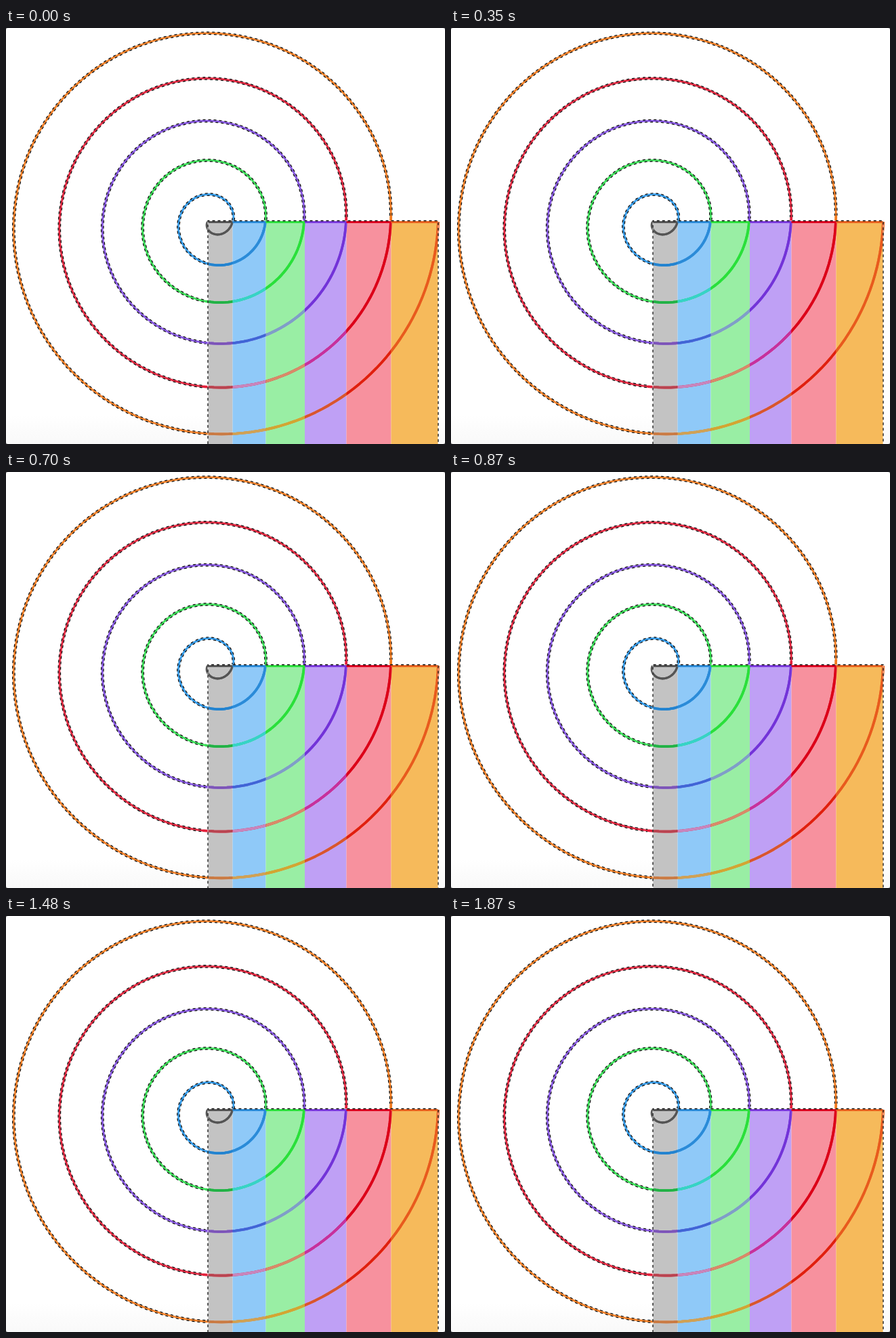
An HTML page that plays this animation: 648 by 614 pixels, repeating every 1.91 s.

```html
<!DOCTYPE html>
<html lang="en">
<head>
<meta charset="utf-8">
<title>Spiral selection</title>
<style>
  html, body { margin: 0; width: 100%; height: 100%; overflow: hidden; background: #fff; }
  svg { display: block; width: 648px; height: 614px; }
</style>
</head>
<body>
<svg id="stage" viewBox="0 0 648 614" fill="none">
  <defs>
    <linearGradient id="floor" x2="0" y2="1">
      <stop stop-color="#fff"/><stop offset="1" stop-color="#f9f9f9"/>
    </linearGradient>
  </defs>
  <rect width="648" height="614" fill="#fff"/>
  <rect y="570" width="648" height="44" fill="url(#floor)"/>
  <path d="M0 0H3Q0 0 0 3ZM648 0H645Q648 0 648 3ZM0 614H3Q0 614 0 611ZM648 614H645Q648 614 648 611Z" fill="#777"/>
</svg>
<script>
const LOOP = 1910, STEPS = 44, DASH = 8, CYCLES = 5;
const CX = 307, CY = 286, LEFT = 298, RIGHT = 638, BOTTOM = 614;
const RIM = 1.7; // distance from the middle of a stroke to its dashed edges
const stage = document.getElementById('stage');

// Spiral radius after each half turn
const radii = [10, 28, 52, 76, 105, 133, 164.5, 195, 228, 261, 295.5, 331];
const edges = [LEFT, 334.5, 383.5, 441, 502.5, 568.5, RIGHT];
const fills = ['#c3c3c3', '#8fc9f8', '#99eea4', '#bfa0f5', '#f7919e', '#f6ba5b'];
const rims = ['#555', '#2b8bd8', '#2bdf3c', '#7b3adc', '#dc0020', '#e8621f'];
// One list per turn: colour outside the stripes, then inside each stripe
const turns = [
  ['#555', '#555'],
  ['#2b97e9', '#2383cf', '#2b8bd8'],
  ['#34e052', '#22b146', '#35d3c8', '#2ae03a'],
  ['#8452e2', '#7d55b8', '#3f66d6', '#7f9fc8', '#7333d8'],
  ['#e3203a', '#b94450', '#c985bd', '#d98a68', '#c6309f', '#dc0018'],
  ['#f27c20', '#c97a44', '#cfa255', '#d2a632', '#d8552f', '#e01e10', '#e85a1e']
];

function add(name, attrs, parent = stage) {
  const node = document.createElementNS('http://www.w3.org/2000/svg', name);
  for (const key in attrs) node.setAttribute(key, attrs[key]);
  parent.appendChild(node);
  return node;
}

function radiusAt(turn) {
  const at = turn * 2 + 1;
  const i = Math.max(0, Math.min(radii.length - 2, Math.floor(at)));
  const f = at - i, b = radii[i], c = radii[i + 1];
  const a = radii[i - 1] ?? 2 * b - c, d = radii[i + 2] ?? 2 * c - b;
  return b + f / 2 * (c - a + f * (2 * a - 5 * b + 4 * c - d + f * (3 * (b - c) + d - a)));
}

function spiral(from, to, grow = 0, keep = () => true) {
  const count = Math.ceil((to - from) * 180);
  let d = '';
  for (let i = 0; i <= count; i++) {
    const turn = from + (to - from) * i / count;
    const r = radiusAt(turn) + grow, angle = turn * 2 * Math.PI;
    const x = CX + r * Math.cos(angle), y = CY - r * Math.sin(angle);
    if (keep(x, y)) d += (d ? 'L' : 'M') + x.toFixed(2) + ' ' + y.toFixed(2);
  }
  return d;
}

const defs = stage.querySelector('defs');
fills.forEach((fill, i) => {
  const box = { x: edges[i], y: CY, width: edges[i + 1] - edges[i], height: BOTTOM - CY };
  add('rect', { ...box, fill });
  const clip = add('clipPath', { id: 'stripe' + i }, defs);
  add('rect', i === fills.length - 1 ? { ...box, width: box.width + 3 } : box, clip);
});

turns.forEach(([outside, ...inside], k) => {
  const d = k ? spiral(k - 1, k) : spiral(-0.5, 0, -0.6);
  const line = { d, 'stroke-width': k ? 3.8 : 3.2, 'stroke-linejoin': 'round' };
  add('path', { ...line, stroke: outside });
  inside.forEach((stroke, i) => {
    add('path', { ...line, stroke, 'clip-path': `url(#stripe${i})` });
  });
});

rims.forEach((stroke, i) => {
  add('path', { d: `M${edges[i]} 286.5H${edges[i + 1]}`, stroke, 'stroke-width': 3 });
});

const outline = [`M${LEFT} ${BOTTOM}V284.5H${RIGHT}V${BOTTOM}`];
for (let k = 0; k < 5; k++) {
  for (const side of [RIM, -RIM]) {
    outline.push(spiral(k, k + 1, side, (x, y) => y < 284.5 || x < LEFT));
  }
}
const ants = outline.map(d => {
  add('path', { d, stroke: '#fff', 'stroke-width': 1.2, 'stroke-opacity': 0.6 });
  return add('path', { d, stroke: '#111', 'stroke-width': 1.3, 'stroke-dasharray': `${DASH / 2} ${DASH / 2}` });
});

function draw(ms) {
  const step = Math.floor((ms % LOOP) / LOOP * STEPS);
  const offset = -(step * CYCLES / STEPS % 1) * DASH;
  ants.forEach(path => path.setAttribute('stroke-dashoffset', offset.toFixed(3)));
}

const start = performance.now();
function tick() {
  draw(performance.now() - start);
  requestAnimationFrame(tick);
}
tick();
</script>
</body>
</html>
```
